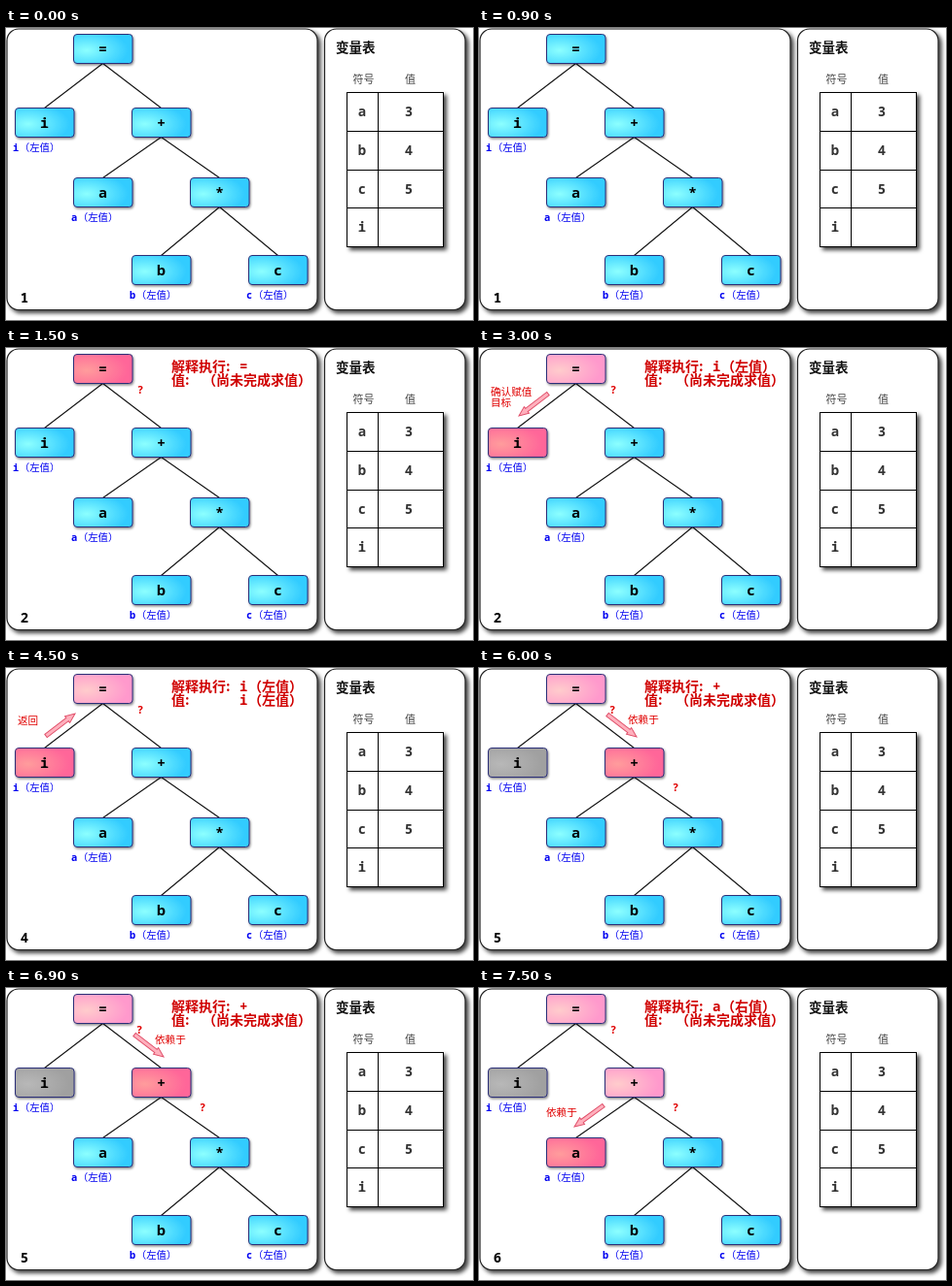
Write an HTML page that moves like this. It is 480 px wide and 301 px high and loops after 8000 ms.

```html
<!DOCTYPE html>
<html lang="zh-CN">
<head>
<meta charset="utf-8">
<title>语法树求值</title>
<style>
html, body { margin: 0; width: 100%; height: 100%; overflow: hidden; background: #fff; }
svg { display: block; width: 480px; height: 301px; }
text { font-family: "Noto Sans CJK SC", "Noto Sans CJK", sans-serif; }
.mono { font-family: "Noto Sans Mono", monospace; font-weight: bold; }
.panel { fill: #fff; stroke: #222; stroke-width: 1.2; filter: url(#deep); }
.node { stroke: #2c2f78; stroke-width: 1; filter: url(#soft); }
.edge { stroke: #111; stroke-width: 1.1; }
.table { fill: #fff; stroke: #000; stroke-width: 1; shape-rendering: crispEdges; }
.arrow { fill: #ffb0bd; stroke: #e0506a; stroke-width: 1; }
</style>
</head>
<body>
<svg viewBox="0 0 480 301">
  <defs id="defs">
    <filter id="deep" x="-10%" y="-10%" width="125%" height="125%">
      <feDropShadow dx="3" dy="3" stdDeviation="2" flood-color="#000" flood-opacity=".75"/>
    </filter>
    <filter id="soft" x="-10%" y="-15%" width="125%" height="145%">
      <feDropShadow dx="1" dy="1.5" stdDeviation="1" flood-color="#000" flood-opacity=".45"/>
    </filter>
  </defs>
  <g id="backdrop"></g>
  <g id="scene"></g>
</svg>
<script>
const RED = '#d00000', BLUE = '#0000f0';
const STEP_MS = 1500, LOOP_MS = 8000;

// Highlight and outer colour of each node state.
const gradients = {
  blue: ['#8cffff', '#33ccff'],
  red: ['#ff9c9c', '#ff6699'],
  pale: ['#ffcccc', '#ff99cc'],
  gray: ['#b8b8b8', '#a0a0a0']
};

// Centre of each node; variables also carry an l-value caption.
const nodes = {
  '=': [99.5, 21.5], i: [39.5, 97.5], '+': [159.5, 97.5], a: [99.5, 169.5],
  '*': [219.5, 169.5], b: [159.5, 249.5], c: [279.5, 249.5]
};
const edges = ['=i', '=+', '+a', '+*', '*b', '*c'];

const pending = '（尚未完成求值）';
const steps = [
  { label: 1 },
  { label: 2, fills: { '=': 'red' }, running: '=', value: pending, marks: [[138, 47]] },
  { label: 2, fills: { '=': 'pale', i: 'red' }, running: 'i（左值）', value: pending,
    marks: [[138, 47]], arrow: [71, 47, 41, 70], notes: [['确认赋值', 12, 49], ['目标', 12, 60]] },
  { label: 4, fills: { '=': 'pale', i: 'red' }, running: 'i（左值）', value: 'i（左值）',
    marks: [[138, 47]], arrow: [41, 70, 71, 47], notes: [['返回', 12, 58]] },
  { label: 5, fills: { '=': 'pale', i: 'gray', '+': 'red' }, running: '+', value: pending,
    marks: [[137, 47], [202, 127]], arrow: [132, 48, 162, 71], notes: [['依赖于', 153, 57]] },
  { label: 6, fills: { '=': 'pale', i: 'gray', '+': 'pale', a: 'red' }, running: 'a（右值）', value: pending,
    marks: [[138, 47], [202, 127]], arrow: [128, 121, 98, 143], notes: [['依赖于', 69, 132]] }
];

const byId = id => document.getElementById(id);
const text = (s, x, y, size, fill, extra = '') =>
  `<text x="${x}" y="${y}" font-size="${size}" fill="${fill}" ${extra}>${s}</text>`;
const mono = (s, x, y, size, fill, anchor = 'middle') =>
  text(s, x, y, size, fill, `class="mono" text-anchor="${anchor}"`);
const line = (x1, y1, x2, y2, cls) =>
  `<line class="${cls}" x1="${x1}" y1="${y1}" x2="${x2}" y2="${y2}"/>`;
const rect = (x, y, w, h, r, attrs) =>
  `<rect x="${x}" y="${y}" width="${w}" height="${h}" rx="${r}" ${attrs}/>`;

// A mono letter followed by full-width Chinese text.
const caption = (s, x, y, size, fill, weight = 350) =>
  mono(s[0], x, y, size, fill, 'start') +
  text(s.slice(1), x + size * .65, y, size, fill, `font-weight="${weight}"`);

function drawTable() {
  const left = 350.5, middle = 382.5, right = 449.5, top = 66.5, rowHeight = 39.75;
  const rows = [['a', 3], ['b', 4], ['c', 5], ['i', '']];
  let out = text('变量表', 339, 25, 13.5, '#111', 'font-weight="700"') +
    text('符号', 356.5, 57, 11, '#444') + text('值', 410, 57, 11, '#444') +
    rect(left, top, right - left, rowHeight * 4, 0, 'class="table" filter="url(#deep)"') +
    line(middle, top, middle, top + rowHeight * 4, 'table');
  rows.forEach(([name, value], i) => {
    const y = top + i * rowHeight;
    if (i) out += line(left, y, right, y, 'table');
    out += mono(name, 366, y + 24.5, 14, '#333') + mono(value, 414, y + 24.5, 14, '#333');
  });
  return out;
}

function drawBackdrop() {
  const links = edges.map(([from, to]) => {
    const [x1, y1] = nodes[from], [x2, y2] = nodes[to];
    return line(x1, y1 + 15, x2, y2 - 15, 'edge');
  });
  const captions = ['i', 'a', 'b', 'c'].map(name => {
    const [x, y] = nodes[name];
    return caption(name + '（左值）', x - 32.5, y + 29.5, 10.4, BLUE);
  });
  return rect(1, 1, 319, 289.5, 12, 'class="panel"') +
    rect(327.5, 1, 144.5, 289.5, 12, 'class="panel"') +
    drawTable() + links.join('') + captions.join('');
}

function drawArrow([x1, y1, x2, y2]) {
  const length = Math.hypot(x2 - x1, y2 - y1), neck = length - 10;
  const angle = Math.atan2(y2 - y1, x2 - x1) * 180 / Math.PI;
  return `<path class="arrow" transform="translate(${x1} ${y1}) rotate(${angle})"
    d="M0-2H${neck}V-4.2L${length} 0L${neck} 4.2V2H0Z"/>`;
}

function drawHeading({ running, value }) {
  const chinese = (s, x, y) => text(s, x, y, 14, RED, 'font-weight="700"');
  const result = value === pending ? chinese(value, 202, 38) : caption(value, 240, 38, 14, RED, 700);
  return chinese('解释执行:', 170, 24) + caption(running, 240, 24, 14, RED, 700) +
    chinese('值:', 170, 38) + result;
}

function drawStep({ label, fills = {}, running, value, marks = [], arrow, notes = [] }) {
  let out = Object.entries(nodes).map(([name, [x, y]]) =>
    rect(x - 30, y - 15, 60.5, 30, 3.5, `class="node" fill="url(#${fills[name] || 'blue'})"`) +
    mono(name, x, y + 5, 15, '#000')).join('');
  out += mono(label, 19, 283, 14, '#000');
  if (running) out += drawHeading({ running, value });
  if (arrow) out += drawArrow(arrow);
  out += marks.map(([x, y]) => mono('?', x, y, 11, '#e00000')).join('');
  return out + notes.map(([s, x, y]) => text(s, x, y, 10.6, '#e00000')).join('');
}

byId('defs').innerHTML += Object.entries(gradients).map(([id, [inner, outer]]) =>
  `<radialGradient id="${id}" cx=".22" cy=".55" r=".7">
    <stop stop-color="${inner}"/><stop offset="1" stop-color="${outer}"/>
  </radialGradient>`).join('');
byId('backdrop').innerHTML = drawBackdrop();

const start = performance.now();
let shown = -1;
function tick() {
  const current = Math.floor((performance.now() - start) % LOOP_MS / STEP_MS);
  if (current !== shown) byId('scene').innerHTML = drawStep(steps[shown = current]);
  requestAnimationFrame(tick);
}
tick();
</script>
</body>
</html>
```
